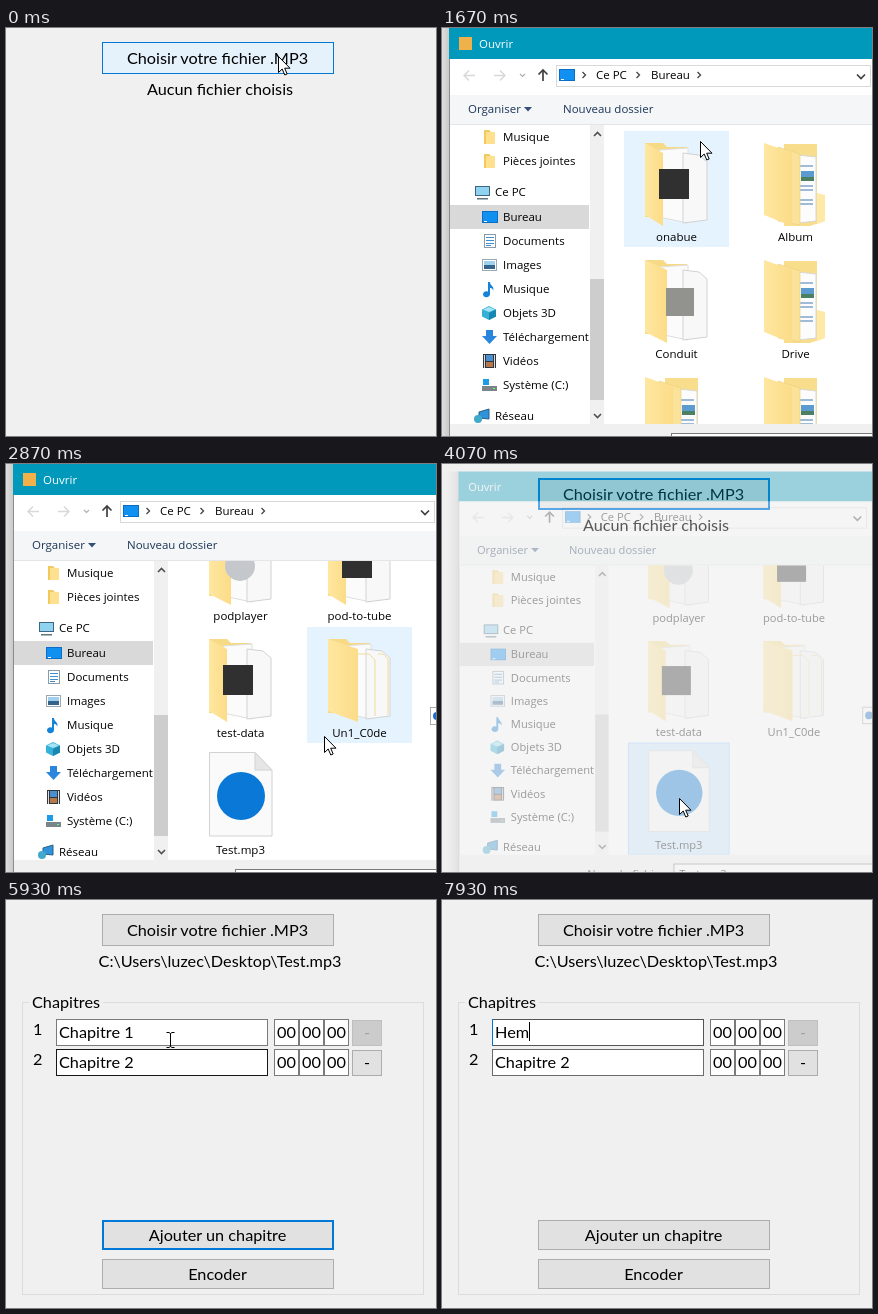
Animation, 430 px wide and 408 px high, one loop 8 s. Source, as an HTML page:

```html
<!DOCTYPE html>
<html lang="fr">
<head>
<meta charset="utf-8">
<title>Chapitres MP3</title>
<style>
html, body { margin: 0; width: 100%; height: 100%; overflow: hidden; background: #f0f0f0; }
svg { display: block; width: 430px; height: 408px; }
text { font: 16.25px Lato, sans-serif; white-space: pre; }
.dlg text { font: 11.5px "Open Sans", "Noto Sans", sans-serif; }
</style>
</head>
<body>
<svg id="stage" viewBox="0 0 430 408"></svg>
<script>
const LOOP = 8000, TICK = 1000 / 15;
const stage = document.getElementById('stage');
const pen = document.createElement('canvas').getContext('2d');

const clamp = (v, a = 0, b = 1) => Math.min(b, Math.max(a, v));
const rect = (x, y, w, h, fill, more = '') =>
  `<rect x="${x}" y="${y}" width="${w}" height="${h}" fill="${fill}" ${more}/>`;
const box = (x, y, w, h, fill, line, lw = 1) =>
  rect(x + lw / 2, y + lw / 2, w - lw, h - lw, fill, `stroke="${line}" stroke-width="${lw}"`);
const path = (d, fill, line = 'none', lw = 1) =>
  `<path d="${d}" fill="${fill}" stroke="${line}" stroke-width="${lw}"/>`;
const stroke = (d, line, lw = 1) => path(d, 'none', line, lw);
const disc = (x, y, r, fill) => `<circle cx="${x}" cy="${y}" r="${r}" fill="${fill}"/>`;
const text = (x, y, s, fill = '#000', anchor = 'start') =>
  `<text x="${x}" y="${y}" fill="${fill}" text-anchor="${anchor}">${s}</text>`;
const at = (x, y, body) => `<g transform="translate(${x} ${y})">${body}</g>`;
const inside = (p, x, y, w, h) => p.x >= x && p.x < x + w && p.y >= y && p.y < y + h;

function textWidth(s) {
  pen.font = '16.25px Lato, sans-serif';
  return pen.measureText(s).width;
}

/* pointer: tick, x, y */
const POINTER = [
  [0, 272, 28], [3, 240, 44], [6, 240, 44], [7, 256, 32], [8, 246, 21], [10, 246, 21],
  [11, 257, 32], [19, 257, 32], [25, 258, 113], [27, 262, 140], [29, 340, 211],
  [41, 340, 211], [43, 318, 272], [44, 238, 309], [46, 218, 338], [48, 222, 344],
  [51, 237, 334], [65, 237, 334], [69, 245, 326], [84, 245, 326], [89, 164, 140],
  [94, 136, 133], [98, 62, 132]
];

function pointerAt(n) {
  let i = POINTER.findIndex(k => k[0] > n);
  if (i < 0) i = POINTER.length;
  const a = POINTER[i - 1], b = POINTER[i] || a;
  const u = b === a ? 0 : (n - a[0]) / (b[0] - a[0]);
  return { x: Math.round(a[1] + (b[1] - a[1]) * u), y: Math.round(a[2] + (b[2] - a[2]) * u) };
}

const ARROW = path('M.5 .5V16.5L4.2 13L6.8 19L9.2 18L6.7 12.2H12Z', '#fff', '#000');
const BEAM = stroke('M-3.5 -7.5H-1L.5 -6.5L2 -7.5H4.5M.5 -6.5V6.5M-3.5 7.5H-1L.5 6.5L2 7.5H4.5', '#000');

/* main form */
const SKIN = {
  normal: ['#e1e1e1', '#adadad', 1],
  focus: ['#e1e1e1', '#0078d7', 2],
  hover: ['#e5f1fb', '#0078d7', 1],
  press: ['#cce4f7', '#005499', 1]
};

const button = (y, h, label, state) =>
  box(96, y, 232, h, ...SKIN[state]) + text(211.5, y + h / 2 + 6, label, '#000', 'middle');

function chapter(i, name, line) {
  const y = 119 + 30 * i, off = i === 0;
  return text(27, y + 16, i + 1) +
    box(50, y, 212, 27, '#fff', line) + name +
    [268, 293, 318].map(x => box(x, y, 25, 27, '#fff', '#7a7a7a') + text(x + 12.5, y + 19, '00', '#000', 'middle')).join('') +
    box(346, y + 1, 30, 26, off ? '#cccccc' : '#e1e1e1', off ? '#bfbfbf' : '#adadad') +
    text(361, y + 19, '-', off ? '#a0a0a0' : '#000', 'middle');
}

function firstName(n) {
  const y = 138;
  if (n < 105) {
    const s = 'Chapitre 1';
    const from = n < 95 ? s.length : Math.round(s.length * (98 - Math.min(n, 98)) / 4);
    const head = s.slice(0, from), x = 53 + textWidth(head);
    const mark = from < s.length ? rect(x, 122, 53 + textWidth(s) - x, 19, '#0078d7') : '';
    return mark + text(53, y, `${head}<tspan fill="#fff">${s.slice(from)}</tspan>`);
  }
  const s = 'Hem'.slice(0, n < 109 ? 1 : n < 111 ? 2 : 3);
  const caret = n >= 114 && n < 119 ? '' : rect(Math.round(53 + textWidth(s)), 122, 1, 19, '#000');
  return text(53, y, s) + caret;
}

function form(n, p) {
  const loaded = n >= 63;
  const top = n < 15 ? (inside(p, 96, 14, 232, 32) ? 'hover' : 'normal') : n < 74 ? 'focus' : 'normal';
  let out = button(14, 32, 'Choisir votre fichier .MP3', top) +
    text(214, 67, loaded ? 'C:\\Users\\luzec\\Desktop\\Test.mp3' : 'Aucun fichier choisis', '#000', 'middle');
  if (!loaded) return out;

  const over = inside(p, 96, 320, 232, 30);
  const pressed = n >= 74 && n < 77 || n >= 82 && n < 84;
  const add = pressed ? 'press' : over ? 'hover' : n >= 74 && n < 94 ? 'focus' : 'normal';
  out += box(16, 102, 402, 293, 'none', '#dcdcdc') + rect(23, 100, 74, 5, '#f0f0f0') +
    text(26, 108, 'Chapitres') +
    button(320, 30, 'Ajouter un chapitre', add) + button(359, 30, 'Encoder', 'normal');
  if (n >= 77) {
    const focus = n >= 95;
    out += chapter(0, firstName(n), focus ? '#555' : '#7a7a7a');
    if (focus) out += rect(50, 119, 1, 27, '#0078d7');
  }
  if (n >= 83) out += chapter(1, text(53, 168, 'Chapitre 2'), n >= 86 && n < 96 ? '#171717' : '#6a6a6a');
  return out;
}

/* file dialog */
const flap = w => path(`M0 2L${w} 12V85L0 74Z`, 'url(#flap)');
const sheets = path('M14 9L43 7V82L14 76Z', '#fbfbfb', '#dedede') +
  path('M38 12L54 14L62 21V79L38 82Z', '#f8f8f8', '#d2d2d2');
const back = path('M0 2H18L22 6H42V76H0Z', '#f6da86');

const FOLDER = {
  dark: back + sheets + flap(18) + rect(14, 28, 30, 30, '#303030'),
  grey: back + sheets + flap(22) + rect(21, 30, 28, 28, '#92928e'),
  gear: back + sheets + flap(22) + disc(31, 46, 15, '#c4c8cc'),
  pages: back + sheets + stroke('M29 17H41L47 23V79M50 17H55L60 22V78', '#f0dc9a') + flap(30),
  docs: path('M20 3H53V76L61 72V80L46 85H20Z', '#f8dd8c') +
    path('M34 14L52 16V80L34 82Z', '#fcfcfc', '#d8d8d8') +
    [24, 44, 48, 58, 62].map(y => rect(36, y, 13, 2, '#9fbbd8')).join('') +
    rect(37, 30, 13, 10, '#5b9bd0') + rect(37, 36, 13, 4, '#4d7f63') +
    path('M53 52L61 54V80L53 83Z', '#ffe9a6') +
    path('M14 6L36 13V84L14 80Z', '#fbe29a', '#efd27c', .7) + flap(28)
};

const audio = path('M.5 .5H46L63 18V84H.5Z', '#fafafa', '#d2d2d2') +
  path('M46 .5V18H63Z', '#e6e6e6', '#d2d2d2') + disc(32, 44, 24, '#0a78d6');
const shortcut = box(5, 80, 16, 18, '#fff', '#aaa') + disc(12, 89, 4, '#1b6fc6');

const FILES = [
  ['onabue', 'dark', 0, 0], ['Album', 'docs', 0, 1],
  ['Conduit', 'grey', 1, 0], ['Drive', 'docs', 1, 1],
  ['Images', 'docs', 2, 0], ['Musique', 'docs', 2, 1],
  ['podplayer', 'gear', 3, 0], ['pod-to-tube', 'dark', 3, 1],
  ['test-data', 'dark', 4, 0], ['Un1_C0de', 'pages', 4, 1],
  ['Test.mp3', 'audio', 5, 0]
];

function fileList(n, p) {
  const scroll = 408 * clamp((n - 31) / 8);
  const items = FILES.map(([name, kind, row, col]) => {
    const x = 182 + 119 * col, y = 103 + 117 * row - scroll;
    if (y > 408 || y < -20) return '';
    const chosen = kind === 'audio' && n >= 58;
    const lit = n >= 19 && p.y > 97 && inside(p, x, y, 105, 117);
    const icon = kind === 'audio' ? at(x + 21, y + 8, audio) : at(x + 21, y + 10, FOLDER[kind]);
    return (chosen ? box(x, y, 105, 116, '#cce8ff', '#99d1ff') : lit ? rect(x, y, 105, 116, '#e5f3ff') : '') +
      icon + text(x + 52.5, y + 110, name, '#000', 'middle');
  }).join('');
  return `<g clip-path="url(#list)">${items}${at(419, 571 - scroll, shortcut)}</g>`;
}

const screen = rect(0, 1, 16, 12, '#0a6fc4') + rect(1, 2, 14, 10, '#1090f0') + rect(2, 11, 3, 1, '#fff');
const ICON = {
  folder: path('M2 0H7L9 2H13V14H2Z', '#f2c95c') + rect(4, 2, 9, 12, '#ffe08e'),
  pc: box(1, 1, 15, 10, '#8fd3f0', '#3e6680') + rect(3, 13, 11, 1.5, '#5f747f'),
  desk: screen,
  doc: box(2, 0, 12, 14, '#fff', '#8a9aa8') + stroke('M4 3.5H12M4 6.5H12M4 9.5H12M4 11.5H9', '#3f8fd0'),
  image: box(0, 1, 15, 12, '#fff', '#9aa8b4') + rect(2, 3, 11, 4, '#9fd0ee') + rect(2, 7, 11, 4, '#35648a'),
  note: path('M6 0H8C8 4 13 4 11 9C11 6 9 6 8 6V12A3.5 3 0 1 1 6 9.5Z', '#1583d8'),
  cube: path('M7 0L14 3.5V10.5L7 14L0 10.5V3.5Z', '#36b0d6') + path('M7 7L14 3.5V10.5L7 14Z', '#1987b0') +
    path('M7 1L13 3.5L7 6L1 3.5Z', '#a5e4f4'),
  down: path('M4 0H11V6H15L7.5 14L0 6H4Z', '#2a86dc'),
  film: rect(1, 0, 13, 14, '#30363e') + rect(4, 1, 7, 6, '#4a90d0') + rect(4, 8, 7, 5, '#b9784a') +
    stroke('M2.5 1V14M12.5 1V14', '#ddd'),
  disk: rect(0, 8, 15, 5, '#7c848b') + rect(11, 10, 2, 1, '#6f6') + rect(1, 1, 6, 6, '#1b9be8'),
  net: path('M5 3L15 0V10L5 9Z', '#2f93dc', '#2b5f86') + disc(4, 10, 4, '#41a9c9')
};

const TREE = [
  [109, 'Musique', 'folder', 1], [133, 'Pièces jointes', 'folder', 1], [164, 'Ce PC', 'pc', 0],
  [189, 'Bureau', 'desk', 1], [213, 'Documents', 'doc', 1], [237, 'Images', 'image', 1],
  [261, 'Musique', 'note', 1], [285, 'Objets 3D', 'cube', 1], [309, 'Téléchargement', 'down', 1],
  [333, 'Vidéos', 'film', 1], [357, 'Système (C:)', 'disk', 1], [388, 'Réseau', 'net', 0]
];

const tree = rect(8, 177, 139, 24, '#d9d9d9') +
  `<g clip-path="url(#side)">${TREE.map(([y, s, icon, sub]) =>
    at(32 + 8 * sub, y - 7, ICON[icon]) + text(53 + 8 * sub, y + 4, s)).join('')}</g>` +
  rect(148, 97, 14, 299, '#f0f0f0') + rect(148, 251, 14, 121, '#cdcdcd') +
  stroke('M152 108L155.5 104.5L159 108M152 386L155.5 389.5L159 386', '#505050', 1.6);

const chevron = (x, y) => stroke(`M${x - 1.5} ${y - 3}l3 3l-3 3`, '#444', 1.3);
const bars = rect(8, 31, 640, 36, '#fff') + rect(8, 67, 640, 30, '#f5f6f7') + rect(8, 96, 640, 1, '#e3e5e8') +
  stroke('M33 47.5H22M27 42.5L22 47.5L27 52.5M52 47.5H63M58 42.5L63 47.5L58 52.5', '#d8d8d8', 1.4) +
  stroke('M78 46L80.5 48.5L83 46', '#b0b0b0', 1.2) +
  stroke('M101 53V42M96.5 46.5L101 42L105.5 46.5', '#404040', 1.7) +
  box(114, 37, 315, 22, '#fff', '#d9d9d9') + at(117, 40, screen) +
  chevron(142, 47) + text(154, 51, 'Ce PC') + chevron(196, 47) + text(209, 51, 'Bureau') + chevron(257, 47) +
  stroke('M415 46.5L419 50.5L423 46.5', '#404040', 1.7) +
  text(26, 85, 'Organiser', '#1b3558') + path('M82 79H90L86 83.5Z', '#344f78') +
  text(121, 85, 'Nouveau dossier', '#1b3558');

function dialog(n, p) {
  if (n < 15 || n >= 62) return '';
  const closing = n >= 59;
  const alpha = closing ? clamp((62 - n) * .35) : clamp((n - 14) / 4);
  const scale = closing ? 1 - .032 * Math.max(0, n - 60) : 1 - .1 * (1 - alpha) ** 2;
  const name = n >= 58 ? text(235, 420, 'Test.mp3') : '';
  return `<g class="dlg" opacity="${alpha}" transform="translate(306 234) scale(${scale}) translate(-306 -234)">` +
    rect(-6, 0, 13, 470, 'url(#shade)') + rect(7, 0, 1, 470, '#8c8c8c') +
    rect(8, 0, 640, 470, '#fff') + rect(7, 0, 640, 31, '#0099bc') +
    (closing ? '' : rect(17, 9, 13, 13, '#f0b04a')) +
    text(closing ? 17 : 37, 20, 'Ouvrir', '#fff') +
    bars + tree + fileList(n, p) +
    rect(8, 396, 640, 80, '#f0f0f0') + text(140, 420, 'Nom du fichier :') +
    box(229, 405, 300, 23, '#fff', '#7a7a7a') + name + '</g>';
}

const DEFS = `<defs>
<linearGradient id="flap"><stop offset="0" stop-color="#ffe7a0"/><stop offset="1" stop-color="#fbdc88"/></linearGradient>
<linearGradient id="shade"><stop offset="0" stop-color="#000" stop-opacity="0"/><stop offset="1" stop-color="#000" stop-opacity=".16"/></linearGradient>
<clipPath id="list"><rect x="164" y="97" width="480" height="299"/></clipPath>
<clipPath id="side"><rect x="8" y="97" width="139" height="299"/></clipPath>
</defs>`;

function pointer(n, p) {
  if (n >= 107) return '';
  const typing = n >= 85 && (inside(p, 50, 119, 212, 27) || inside(p, 50, 149, 212, 27));
  return at(p.x, p.y, typing ? BEAM : ARROW);
}

function draw(n) {
  const p = pointerAt(n);
  stage.innerHTML = DEFS + rect(0, 0, 430, 408, '#f0f0f0') + form(n, p) + dialog(n, p) + pointer(n, p);
}

const start = performance.now();
let shown = -1;
function frame() {
  const t = (performance.now() - start) % LOOP;
  const n = Math.floor((t + 4) / TICK) % 120;
  if (n !== shown) draw(shown = n);
  requestAnimationFrame(frame);
}
frame();
</script>
</body>
</html>
```
